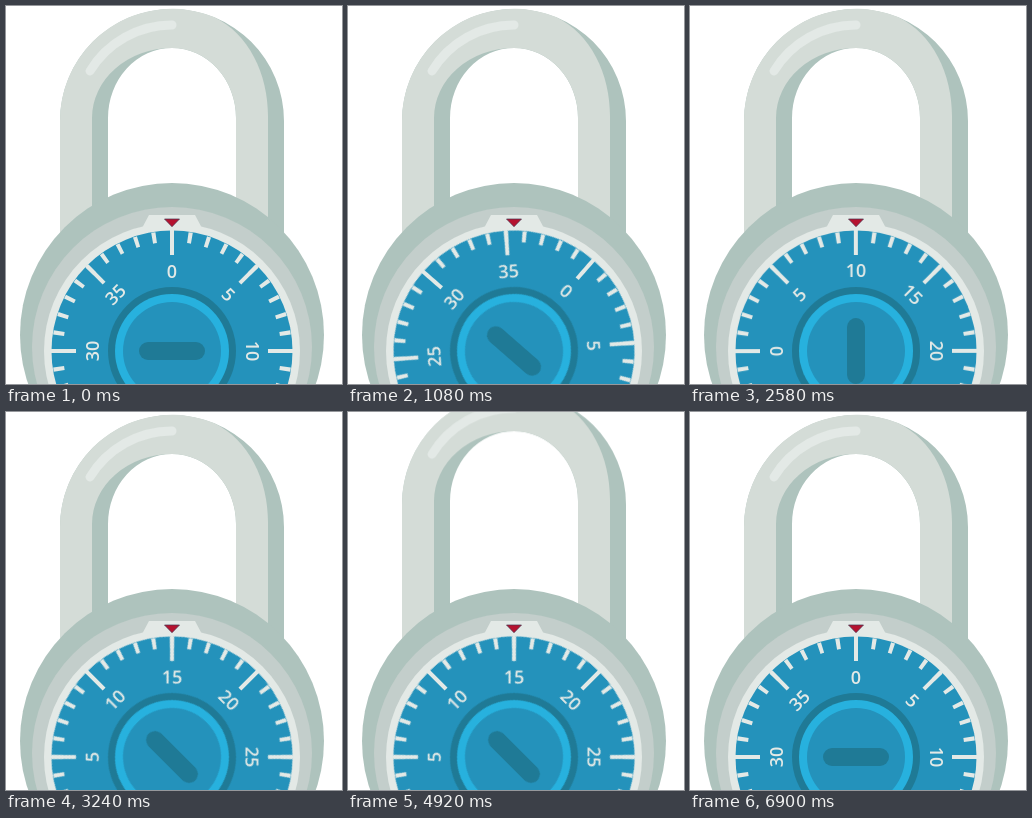
An HTML page without scripts that plays this animation: 336 px wide and 378 px high, repeating every 7.2 s.

```html
<!DOCTYPE html>
<html lang="en">
<head>
<meta charset="utf-8">
<title>Combination lock</title>
<style>
  html, body { margin: 0; width: 100%; height: 100%; overflow: hidden; background: #fff; }
  svg { display: block; width: 336px; height: 378px; }

  .shade { fill: #aec3bd; }
  .metal { fill: #d4dcd7; }
  .rim   { fill: #c3cecb; }
  .pale  { fill: #e3e9e6; }
  .blue  { fill: #2492bb; }
  .deep  { fill: #1f7a96; }
  .glow  { fill: #27b1de; }
  .line  { fill: none; stroke: #e3e9e6; }

  text {
    font: 600 18px "Open Sans", "Noto Sans", sans-serif;
    font-stretch: 75%;
    text-anchor: middle;
    fill: #e3e9e6;
  }

  .dial, .shackle { animation: 7.2s cubic-bezier(.08, 0, .92, 1) infinite; }
  .dial { animation-name: spin; }
  .shackle { animation-name: lift; }

  @keyframes spin {
    0%, .833%        { transform: rotate(0deg); }
    25%, 26.667%     { transform: rotate(675deg); }
    45%, 46.667%     { transform: rotate(585deg); }
    67.25%, 75%      { transform: rotate(945deg); }
    95.833%, 100%    { transform: rotate(1800deg); }
  }
  @keyframes lift {
    0%, 64.583%      { transform: translateY(0); }
    71.25%, 75%      { transform: translateY(-40px); }
    85.333%, 100%    { transform: translateY(0); }
  }
</style>
</head>
<body>
<svg viewBox="0 0 336 378">
  <defs>
    <path id="tick" class="line" stroke-width="4" d="M0-121V-96"/>
  </defs>

  <g class="shackle">
    <path class="shade" d="M54 300V115A112 112 0 0 1 278 115V300H230V112A64 70 0 0 0 102 112V300Z"/>
    <path class="metal" d="M54 300V115A112 112 0 0 1 208 11C243 28 262 68 262 110V300H230V112A64 70 0 0 0 166 42A80 70 0 0 0 86 112V300Z"/>
    <path class="line" stroke-width="9" stroke-linecap="round" d="M84 65A96 96 0 0 1 166 19"/>
  </g>

  <circle class="shade" cx="166" cy="329" r="152"/>
  <circle class="rim" cx="166" cy="341" r="140"/>
  <circle class="pale" cx="166" cy="345" r="128"/>
  <path class="pale" d="M143 209H189L197 224H135Z"/>

  <g transform="translate(166 345)">
    <g class="dial">
      <circle class="blue" r="120.5"/>
      <circle class="line" r="114.5" stroke-width="11" pathLength="720" stroke-dasharray="4 14" stroke-dashoffset="2"/>
      <g><use href="#tick"/><text y="-73.5">0</text></g>
      <g transform="rotate(45)"><use href="#tick"/><text y="-73.5">5</text></g>
      <g transform="rotate(90)"><use href="#tick"/><text y="-73.5">10</text></g>
      <g transform="rotate(135)"><use href="#tick"/><text y="-73.5">15</text></g>
      <g transform="rotate(180)"><use href="#tick"/><text y="-73.5">20</text></g>
      <g transform="rotate(225)"><use href="#tick"/><text y="-73.5">25</text></g>
      <g transform="rotate(270)"><use href="#tick"/><text y="-73.5">30</text></g>
      <g transform="rotate(315)"><use href="#tick"/><text y="-73.5">35</text></g>
      <circle class="deep" r="64"/>
      <circle class="glow" r="57"/>
      <circle class="blue" r="49"/>
      <rect class="deep" x="-33" y="-9" width="66" height="18" rx="9"/>
    </g>
  </g>

  <path fill="#b5122f" stroke="#44344f" stroke-width=".7" d="M158.5 213H173.5L166 220.7Z"/>
</svg>
</body>
</html>
```
